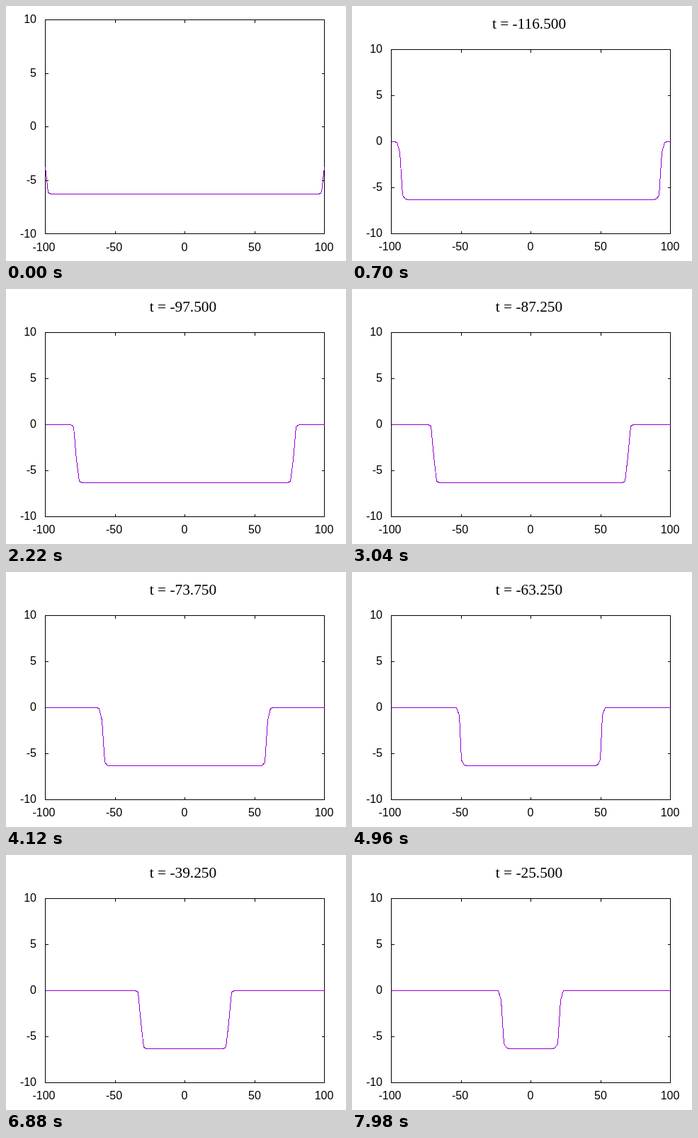
Recreate the animation shown at these times as an HTML page. Size 480 px wide and 360 px high, loop 8 s.

```html
<!DOCTYPE html>
<html lang="en">
<head>
<meta charset="utf-8">
<title>Kink and antikink</title>
<style>
  html, body { margin: 0; width: 100%; height: 100%; overflow: hidden; background: #fff; }
  svg { display: block; width: 480px; height: 360px; }
  path, polyline { fill: none; stroke: #000; stroke-width: 1; shape-rendering: crispEdges; }
  #curve { stroke: #9400d3; }
  text { font: 16px "Liberation Sans", Arial, sans-serif; text-anchor: middle; }
  .y { text-anchor: end; }
  #title { font: 21.33px "Liberation Serif", "Times New Roman", serif; }
</style>
</head>
<body>
<svg viewBox="0 0 480 360">
  <g id="axes"></g>
  <polyline id="curve"/>
  <text id="title" x="250" y="32"></text>
</svg>
<script>
const STEP_MS = 20, STEPS = 400, SAMPLES = 100;
const LEFT = 55, RIGHT = 449, BOTTOM = 321, TICK = 4;
const SPEED = 0.8, GAMMA = 1 / Math.sqrt(1 - SPEED * SPEED);
const axes = document.getElementById('axes');
const curve = document.getElementById('curve');
const title = document.getElementById('title');

const mid = v => Math.round(v) + 0.5;
const xPos = x => LEFT + (x + 100) / 200 * (RIGHT - LEFT);
const yPos = (y, top) => BOTTOM - (y + 10) / 20 * (BOTTOM - top);
const field = (x, t) =>
  4 * Math.atan(Math.sinh(GAMMA * SPEED * t) / Math.cosh(GAMMA * x));

function drawAxes(top, shift) {
  const l = mid(LEFT), r = mid(RIGHT), b = mid(BOTTOM), t = mid(top);
  let lines = `M${l} ${t}H${r}V${b}H${l}Z`;
  let labels = '';
  for (let v = -10; v <= 10; v += 5) {
    const y = mid(yPos(v, top));
    lines += `M${l} ${y}h${TICK}M${r} ${y}h${-TICK}`;
    const drop = v === -10 ? shift : 0;
    labels += `<text class="y" x="43" y="${y + 4.5 + drop}">${v}</text>`;
  }
  for (let v = -100; v <= 100; v += 50) {
    const x = mid(xPos(v));
    lines += `M${x} ${b}v${-TICK}M${x} ${t}v${TICK}`;
    const nudge = v < 0 ? -2 : -0.5;
    labels += `<text x="${x + nudge}" y="${345 + shift}">${v}</text>`;
  }
  axes.innerHTML = `<path d="${lines}"/>${labels}`;
}

let shownStep = -1, shownTop = -1;

function render() {
  const step = Math.floor(performance.now() / STEP_MS) % STEPS;
  if (step !== shownStep) {
    shownStep = step;
    const t = -125.25 + step * 0.25;
    // The opening plot has no title, so its frame is taller.
    const top = step ? 61 : 19;
    if (top !== shownTop) drawAxes(shownTop = top, step ? 0 : 1);
    title.textContent = step ? `t = ${t.toFixed(3)}` : '';
    curve.setAttribute('points', Array.from({ length: SAMPLES }, (_, i) => {
      const x = -100 + 200 * i / (SAMPLES - 1);
      return `${mid(xPos(x))},${mid(yPos(field(x, t), top))}`;
    }).join(' '));
  }
  requestAnimationFrame(render);
}
render();
</script>
</body>
</html>
```
